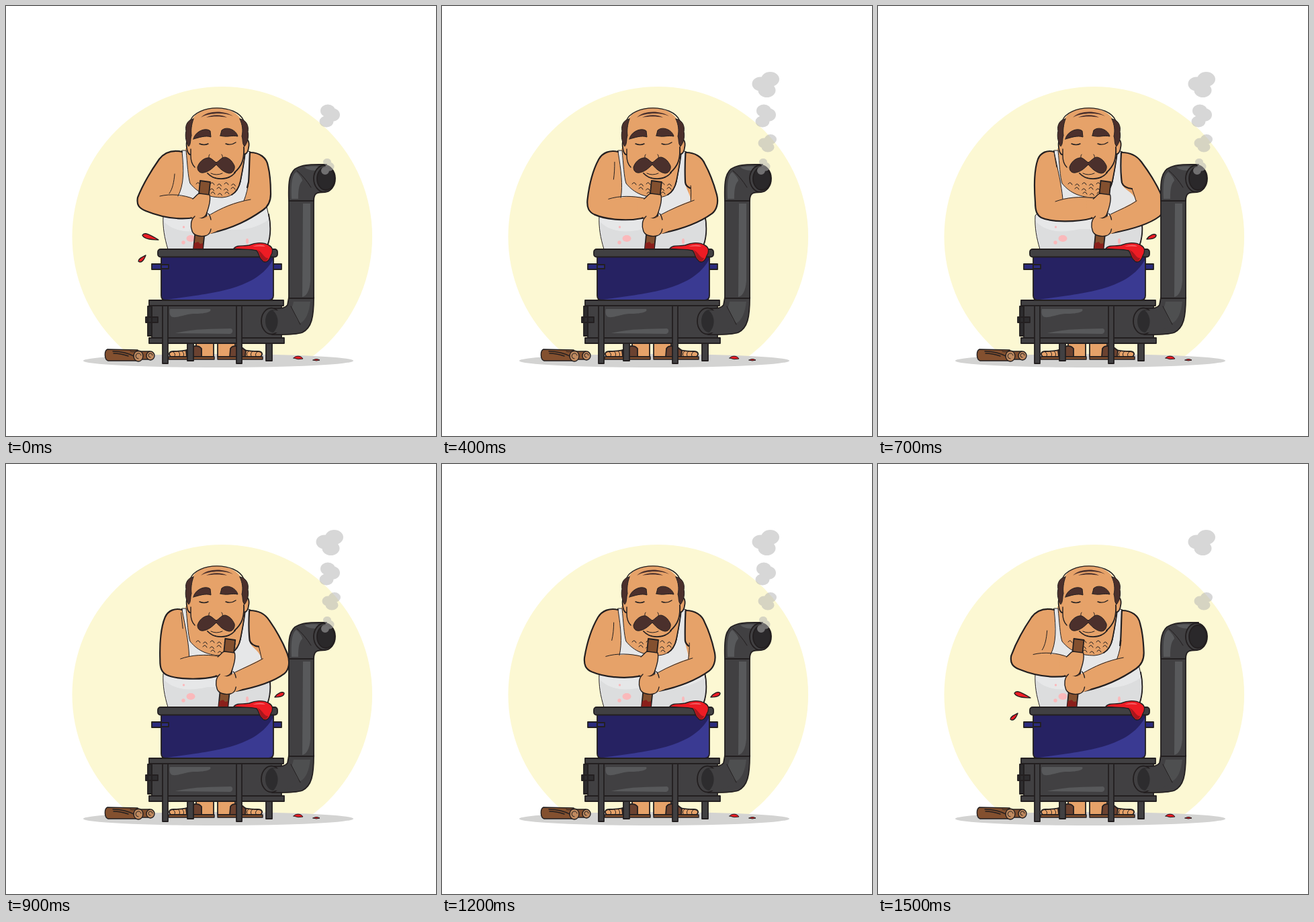
Write an HTML page that moves like this. It is 640x640 px and loops after 1.6 s.

```html
<!DOCTYPE html>
<html lang="en">
<head>
<meta charset="utf-8">
<title>Stirring the pot</title>
<style>
  html, body { margin: 0; width: 100%; height: 100%; overflow: hidden; background: #fff; }
  svg { display: block; width: 100%; height: 100%; }
  path, rect, ellipse, circle { stroke-linejoin: round; stroke-linecap: round; }
  .ink { stroke: #231f20; stroke-width: 1.8; }
  .thin { stroke: #231f20; stroke-width: 1; }
  .mid { stroke: #231f20; stroke-width: 1.4; }
  .bold { stroke: #231f20; stroke-width: 2.2; }
  .line { fill: none; }
  .skin { fill: #e6a269; }
  .hair { fill: #4b302c; }
  .iron { fill: #414042; }
  .shine { fill: #58595b; stroke: none; }
  .wood { fill: #83502f; }
  .red { fill: #ed1c24; }
  .smoke { fill: #b2b2b2; opacity: .52; }
</style>
</head>
<body>
<svg viewBox="0 0 640 640">
  <clipPath id="floor"><rect width="640" height="527"/></clipPath>
  <circle cx="321.8" cy="343.3" r="223.3" fill="#fcf8d3" clip-path="url(#floor)"/>
  <ellipse cx="316" cy="528" rx="201" ry="10" fill="#d3d3d2"/>

  <g id="logs" class="mid">
    <path class="wood" d="M151 511L196 512L199 528L152 528C146 526 146 513 151 511Z"/>
    <path class="wood" d="M196 514H214V526H197Z"/>
    <path class="line" d="M159 514C172 514 183 517 192 522M160 517C170 517 176 519 182 521"/>
    <ellipse cx="197" cy="521" rx="7" ry="8" fill="#c08a5f"/>
    <ellipse cx="215" cy="520.5" rx="6" ry="6.5" fill="#c08a5f"/>
    <path class="thin line" d="M201 520a4 4 0 1 0-4 5M218 520a3 3 0 1 0-3 3M185 514C190 516 194 513 200 514"/>
  </g>

  <g id="feet" class="ink">
    <path class="skin" d="M283 500H309V522H245C241 518 243 514 249 514C262 514 272 513 283 506Z"/>
    <path class="skin" d="M341 500H315V522H379C383 518 381 514 375 514C362 514 352 513 341 506Z"/>
    <path fill="#6b4230" d="M268 513C276 505 287 504 291 510L291 522H269ZM357 513C349 505 337 504 334 510L333 522H356Z"/>
    <path class="wood mid" d="M242 522H310V526H242ZM315 522H382V526H315Z"/>
    <path class="thin line" d="M249 515q4 3 2 6M256 514q4 3 2 7M262 514q4 3 2 7M374 515q-4 3-2 6M367 514q-4 3-2 7M361 514q-4 3-2 7"/>
  </g>

  <g id="body">
    <path class="skin" d="M267 212H358L352 262C348 279 338 287 322 287C300 287 285 279 273 266Z"/>
    <path fill="#e6e7e8" class="thin" d="M262 215L268 215C270 235 271 255 274 264C286 279 302 285 322 285C338 284 346 274 349 262C352 245 355 230 356 215L364 217L372 262L386 290L391 312C395 328 394 348 387 362H241C236 345 233 330 234 312L245 300L258 262Z"/>
    <path fill="#dcddde" d="M236 322C252 337 274 338 300 332C330 331 360 340 391 318C394 335 392 350 387 361H242C238 346 236 334 236 322Z"/>
    <path class="ink line" d="M391 310C395 328 394 348 387 361M356 217C355 230 352 245 349 260C347 270 343 277 336 281"/>
    <g fill="#fab9bb">
      <ellipse cx="275" cy="346" rx="6.5" ry="5"/><circle cx="264.5" cy="329" r="1.7"/>
      <circle cx="264" cy="352" r="2.7"/><ellipse cx="359" cy="350" rx="2" ry="4"/>
    </g>
    <path id="chest" class="thin line"/>
  </g>

  <path id="armR" class="skin"/><path id="armRLine" class="bold line"/>
  <path id="armhole" class="bold line"/>
  <path id="armL" class="skin"/><path id="armLLine" class="bold line"/>
  <path id="folds" class="thin line"/>

  <g id="head">
    <path class="ink skin" d="M275 199C269 195 268 203 269 211C270 220 274 223 277 220ZM353 199C360 195 363 203 361 211C360 219 356 222 352 220Z"/>
    <path class="skin" d="M274 180C276 142 349 142 354 180V224C354 238 346 246 341 249C332 260 311 261 301 251C287 248 275 238 275 222Z"/>
    <path class="mid line" d="M274 171C284 146 343 145 354 171M275 213V223C275 231 277 236 281 240"/>
    <path class="ink line" d="M354 210C355 230 350 239 340 248M300 249C310 260 331 260 341 248"/>
    <path class="thin hair" d="M279 168C271 169 266 177 268 186C266 194 268 203 272 209C276 203 274 198 276 193C275 185 276 177 279 168ZM348 168C357 169 362 178 360 187C362 195 359 204 355 209C351 204 353 199 351 194C353 185 352 177 348 168Z"/>
    <path class="hair" d="M290 166C300 155 325 155 338 164C325 158 302 159 290 166ZM298 166C307 161 321 161 329 166C320 164 307 164 298 166Z"/>
    <path class="thin hair" d="M279 198C281 187 297 180 304 186L305 195C297 192 287 196 279 198ZM319 193L321 185C329 178 343 185 345 194C336 192 328 196 319 193Z"/>
    <path class="mid line" d="M288 205Q295 208 301 205M327 205Q335 208 342 203"/>
    <path class="thin line" d="M303 221Q300 225 304 228M321 221Q324 225 321 228"/>
    <path class="thin hair" d="M313 233C308 230 305 225 300 226C293 227 287 233 285 240C285 246 289 249 294 248C301 247 307 242 313 236C319 243 325 248 332 249C338 249 341 243 340 238C337 231 332 226 326 225C321 225 318 230 313 233Z"/>
    <path class="thin line" d="M305 249Q313 253 322 249"/>
  </g>

  <g id="grip">
    <path class="ink wood" d="M289 260L304 262L293 362H279Z"/>
    <path fill="#8a1f1b" d="M280 353L286 351L289 354L293 353V362H279Z"/>
    <path class="skin" d="M278 287C283 282 286 279 292 279L303 281C305 288 301 302 298 310C295 317 285 318 276 315L268 313V286Z"/>
    <path class="mid line" d="M278 287C283 283 285 279 288 279L303 281C305 288 301 302 298 310C295 317 285 318 275 315"/>
    <path class="skin" d="M280 312C275 317 274 327 277 335C279 341 288 344 297 342L314 335L310 309L300 312C295 318 287 317 280 312Z"/>
    <path class="mid line" d="M281 313C275 318 274 327 277 335C279 341 288 344 297 342C302 341 304 338 305 332M301 309Q304 312 305 318"/>
  </g>

  <g id="stove" class="ink">
    <path class="iron" d="M270 502H279V528H270ZM387 502H396V528H387Z"/>
    <path class="iron" d="M217 446H410V495H217Z"/>
    <path fill="#2d2c2e" d="M211 447H217V491H211ZM208 463H226V471H208Z"/>
    <path class="shine" d="M244 451H304C307 456 294 458 278 458C265 459 257 464 248 463C243 462 243 455 244 451ZM252 487C280 480 307 481 335 480C339 482 337 488 333 488Z"/>
    <path class="iron" d="M213 438H413V446H213ZM213 494H414V502H213Z"/>
    <path class="iron" d="M233 446H241V532H233ZM343 446H351V532H343Z"/>
  </g>

  <g id="pot" class="ink">
    <path fill="#2b2b7c" d="M217 384H243V392H217ZM394 384H410V392H394Z"/>
    <path fill="#262262" d="M231 373H398V431Q398 438 391 438H238Q231 438 231 431Z"/>
    <path fill="#3a3a92" stroke="none" d="M240 437C300 428 372 424 397 378V431Q397 436 391 437Z"/>
    <path fill="#2b2b7c" d="M231 385H242V391H231Z"/>
    <rect class="iron" x="226" y="362" width="178" height="11.5" rx="4"/>
    <path class="red mid" d="M339 361C343 355 354 358 362 356C371 352 383 351 391 356C399 360 397 367 394 372C391 382 384 383 381 378C376 375 378 370 373 364C362 361 350 363 339 361Z"/>
    <path fill="#a9161d" stroke="none" d="M374 363C379 369 377 374 382 378C385 382 389 379 390 375C384 376 382 366 374 363Z"/>
    <path fill="#f7686c" stroke="none" d="M367 358C375 355 383 355 386 358Q377 357 367 358Z"/>
  </g>

  <g id="pipe" class="ink">
    <path class="iron" d="M392 450C405 449 414 452 419 445L421 434H458C458 463 455 479 441 486C429 490 410 489 396 489Z"/>
    <path class="shine" opacity=".6" d="M428 440H453C451 457 446 468 438 472C430 464 424 459 420 457C424 452 427 447 428 440Z"/>
    <ellipse cx="395" cy="469" rx="15" ry="19.5" class="iron"/>
    <ellipse cx="398" cy="469" rx="12" ry="17" fill="#2d2c2e" stroke="none"/>
    <path class="iron" stroke="none" d="M397 453C411 454 421 452 424 446L436 473C427 485 411 486 398 486C407 477 407 461 397 453Z"/>
    <path class="iron" d="M421 290H458V435H421Z"/>
    <path class="shine" d="M442 294H453V409C452 424 447 432 441 433Z"/>
    <path class="iron" d="M421 290C420 263 421 245 435 240C446 235 462 236 477 236L475 277C463 277 458 278 458 290Z"/>
    <path class="shine" d="M425 287C424 268 425 251 432 247C437 251 441 257 441 260C435 266 435 278 435 287ZM444 240C453 238 464 238 471 240L463 245C456 245 449 244 444 240Z"/>
    <path class="thin line" d="M433 245Q444 254 454 270M424 447L438 474"/>
    <ellipse class="iron" cx="474" cy="257" rx="16" ry="20"/>
    <ellipse cx="476" cy="257" rx="13" ry="17" fill="#2a282a"/>
  </g>

  <path class="thin red" d="M428 524C431 520 439 520 442 525Q435 527 428 524ZM457 527Q462 524 467 527Q462 529 457 527Z"/>
  <path id="dropsL" class="mid red" d="M227 348C216 348 205 347 203 341C206 336 214 340 227 348ZM208 371C205 379 201 383 197 380C197 376 202 374 208 371Z"/>
  <path id="dropR" class="mid red" d="M400 347C404 341 411 338 414 341C414 346 407 347 400 347Z"/>
  <g id="puffs"></g>
</svg>
<script>
const $ = id => document.getElementById(id);
const STEP = 100, STEPS = 16;

// [step, sideways shift of the stick]
const keys = [[0, 0], [2, 11.5], [5, 28.5], [7, 42.5], [8, 43], [10, 31.5], [12, 18], [15, 2.5]];
const REACH = 42.5;

// each limb: far left pose, far right pose
const left = [
  'M262 217C248 214 236 218 228 228C214 248 204 265 196 285C194 296 198 301 208 305C230 314 255 319 281 315',
  'M262 217C252 214 242 218 238 228C233 242 232 266 234 292C234 304 236 311 243 315C258 322 295 322 318 316'];
const leftIn = [
  'L280 287C268 282 262 282 256 283C262 272 265 262 262 217Z',
  'L322 285C305 283 290 284 275 287C273 275 272 260 262 217Z'];
const right = [
  'M363 218C378 218 388 226 390 238C393 250 394 270 394 280C394 292 388 300 382 304C362 318 340 330 305 338',
  'M363 218C376 218 386 224 392 232C404 248 416 268 422 282C428 296 425 308 419 313C402 326 375 333 348 338'];
const rightIn = [
  'L303 311C318 302 335 293 354 290C357 283 360 272 361 262L362 218Z',
  'L346 310C360 303 372 297 384 290C380 276 366 274 363 265L362 218Z'];
const armhole = [
  'M363 218C362 235 362 250 361 262C360 265 360 267 359 270',
  'M362 218C361 235 361 250 363 263C365 269 370 271 378 272'];
const folds = [
  'M229 283C245 279 265 281 279 287M251 250C250 262 248 272 243 279M303 311C320 301 340 292 364 288M262 217C265 245 265 266 256 283M361 262C360 270 358 280 354 290',
  'M264 291C280 285 300 283 322 286M262 217C263 223 264 230 266 240M346 310C360 303 374 298 385 290M262 217C268 245 273 266 275 287M378 272C380 277 382 283 384 290'];

const mix = ([a, b], p) => {
  const end = b.match(/[\d.]+/g);
  let i = 0;
  return a.replace(/[\d.]+/g, n => (+n + (end[i++] - n) * p).toFixed(2));
};

const shiftAt = k => {
  const i = keys.findIndex(([s]) => s > k);
  if (i < 0) return keys.at(-1)[1];
  const [s0, x0] = keys[i - 1], [s1, x1] = keys[i];
  return x0 + (x1 - x0) * (k - s0) / (s1 - s0);
};

// chest hair in three rows
let hairs = '';
[[283, 265, 6], [293, 272, 5], [305, 279, 3]].forEach(([x, y, n]) => {
  for (let i = 0; i < n; i++) hairs += `M${x + i * 10.5} ${y + i % 2 * 2}q3-5 6 1`;
});
$('chest').setAttribute('d', hairs);

// each puff is a union of three ellipses: x, y, rx, ry
const dot = (x, y, rx, ry) => `M${x - rx} ${y}a${rx} ${ry} 0 1 0 ${rx * 2} 0a${rx} ${ry} 0 1 0 ${-rx * 2} 0`;
const puffs = [
  [[478, 232, 6, 5], [482, 239, 6.5, 6.5], [475, 245, 6, 6]],
  [[489, 198.5, 9, 7.5], [479, 204, 8.5, 7.5], [485, 210, 9.5, 7.5]],
  [[479, 156, 11, 9.5], [486, 162, 11, 10], [477, 172, 10.5, 8.5]],
  [[488.5, 109, 13.5, 11], [474, 116, 12.5, 10.5], [483.5, 125.5, 13, 10.5]]
].map(parts => {
  const p = document.createElementNS('http://www.w3.org/2000/svg', 'path');
  p.setAttribute('class', 'smoke');
  p.setAttribute('d', parts.map(c => dot(...c)).join(''));
  return $('puffs').appendChild(p);
});

const show = (el, on) => el.setAttribute('visibility', on ? 'visible' : 'hidden');

function draw(k) {
  const x = shiftAt(k), p = x / REACH;
  const set = (id, d) => $(id).setAttribute('d', d);
  const l = mix(left, p), r = mix(right, p);
  set('armL', l + mix(leftIn, p));
  set('armLLine', l);
  set('armR', r + mix(rightIn, p));
  set('armRLine', r);
  set('armhole', mix(armhole, p));
  set('folds', mix(folds, p));
  $('grip').setAttribute('transform', `translate(${x} 0)`);

  show($('dropsL'), k < 4 || k > 13);
  show($('dropR'), k > 5 && k < 13);
  const evenOn = k !== 5 && k !== 15, oddOn = k !== 0 && k !== 6;
  puffs.forEach((el, i) => show(el, i % 2 ? oddOn : evenOn));
}

let last = -1;
function tick(now) {
  const k = Math.floor(now / STEP) % STEPS;
  if (k !== last) draw(last = k);
  requestAnimationFrame(tick);
}
draw(0);
requestAnimationFrame(tick);
</script>
</body>
</html>
```
